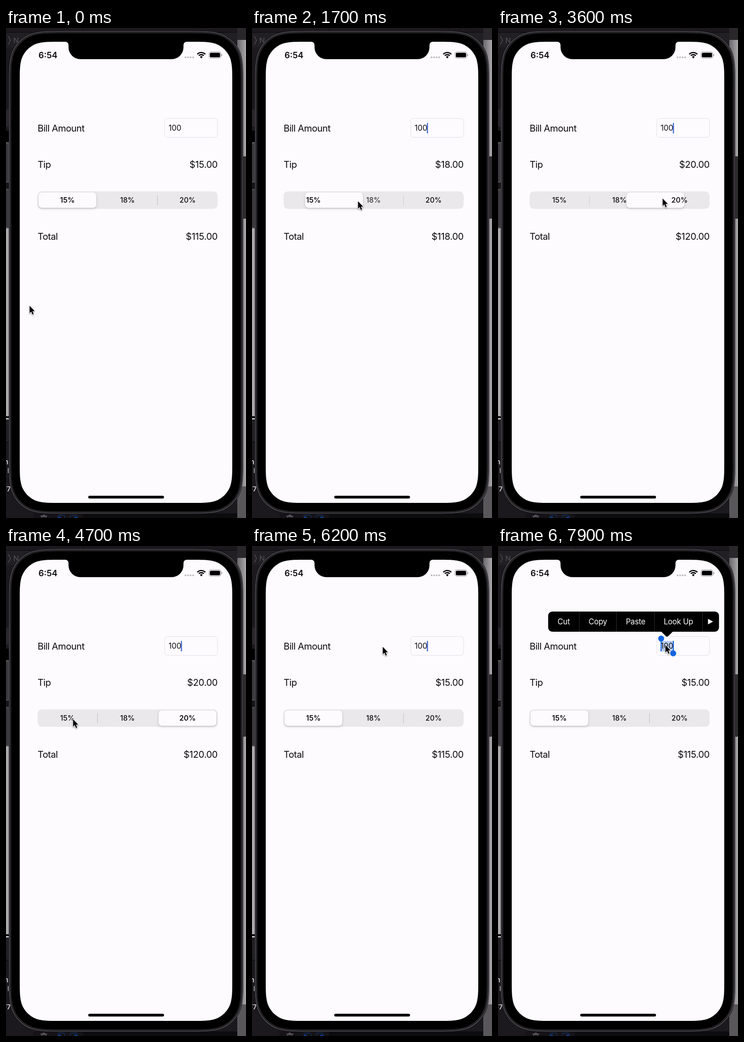
An HTML page with a canvas that plays this animation: 524 by 1069 pixels, repeating every 8 s.

```html
<!DOCTYPE html>
<html lang="en">
<head>
<meta charset="utf-8">
<title>Tip calculator</title>
<style>
html, body { margin: 0; width: 100%; height: 100%; overflow: hidden; background: #1b191d; }
canvas { display: block; width: 524px; height: 1069px; }
</style>
</head>
<body>
<canvas id="stage" width="524" height="1069"></canvas>
<script>
const ctx = document.getElementById('stage').getContext('2d');
const LOOP = 8000;
const INK = '#0b0a0c', SCREEN = '#fdfbfe', BLUE = '#1264e0';
const SANS = 'Inter, "Liberation Sans", sans-serif';
const RATES = [15, 18, 20];

// Each tap selects a rate; the thumb starts sliding at `at`.
const TAPS = [
  { at: 0, index: 0 },
  { at: 1620, index: 1 },
  { at: 3467, index: 2 },
  { at: 5300, index: 0 }
];

// Pointer waypoints: time, x, y.
const POINTER = [
  [0, 51, 605], [100, 45, 599], [220, 32, 580], [450, 85, 490], [700, 190, 400],
  [900, 231, 377], [2520, 231, 377], [2700, 335, 370], [2880, 359, 371],
  [3850, 359, 371], [4080, 255, 376], [4400, 146, 377], [6020, 146, 377],
  [6200, 285, 219], [6400, 374, 212], [6800, 366, 215], [8000, 365, 215]
];

const clamp = v => Math.max(0, Math.min(1, v));
const ramp = (t, from, to) => clamp((t - from) / (to - from));
const smooth = p => p * p * (3 - 2 * p);
const spring = ms => ms <= 0 ? 0 : 1 - (1 + 0.015 * ms) * Math.exp(-0.015 * ms);

function rect(x, y, w, h, color) {
  ctx.fillStyle = color;
  ctx.fillRect(x, y, w, h);
}

function paint(fill, stroke, width) {
  if (fill) { ctx.fillStyle = fill; ctx.fill(); }
  if (stroke) { ctx.strokeStyle = stroke; ctx.lineWidth = width; ctx.stroke(); }
}

function round(x, y, w, h, r, fill, stroke, width = 1) {
  ctx.beginPath();
  ctx.roundRect(x, y, w, h, r);
  paint(fill, stroke, width);
}

// Rounded rectangle whose corners ease into the straight edges.
function squircle(x, y, w, h, r, fill, stroke, width = 1) {
  ctx.beginPath();
  for (let side = 0; side < 4; side++) {
    const a = side * Math.PI / 2, c = Math.cos(a), s = Math.sin(a);
    const along = side % 2 ? h : w, across = side % 2 ? w : h;
    // distances measured back from the corner and inward from the edge
    const at = (back, inward) => {
      const u = along / 2 - back * r, v = inward * r - across / 2;
      return [x + w / 2 + u * c - v * s, y + h / 2 + u * s + v * c];
    };
    ctx.lineTo(...at(1.529, 0));
    ctx.bezierCurveTo(...at(1.088, 0), ...at(0.868, 0), ...at(0.631, 0.075));
    ctx.bezierCurveTo(...at(0.373, 0.169), ...at(0.169, 0.373), ...at(0.075, 0.631));
    ctx.bezierCurveTo(...at(0, 0.868), ...at(0, 1.088), ...at(0, 1.529));
  }
  ctx.closePath();
  paint(fill, stroke, width);
}

function disc(x, y, r, color) {
  ctx.beginPath();
  ctx.arc(x, y, r, 0, Math.PI * 2);
  ctx.fillStyle = color;
  ctx.fill();
}

function poly(points, color) {
  ctx.beginPath();
  points.forEach(([x, y]) => ctx.lineTo(x, y));
  ctx.closePath();
  ctx.fillStyle = color;
  ctx.fill();
}

function text(str, x, y, size, { weight = 400, align = 'left', color = INK, spacing = 0 } = {}) {
  ctx.font = `${weight} ${size}px ${SANS}`;
  ctx.letterSpacing = spacing + 'px';
  ctx.textAlign = align;
  ctx.fillStyle = color;
  ctx.fillText(str, x, y);
}

function faded(alpha, draw) {
  if (alpha <= 0) return;
  ctx.save();
  ctx.globalAlpha = alpha;
  draw();
  ctx.restore();
}

function drawDesktop() {
  rect(0, 0, 524, 1069, '#1b191d');
  rect(0, 9, 506, 1, '#09080a');
  rect(168, 0, 1, 10, '#09080a');
  rect(0, 10, 506, 32, '#211f23');
  text('N', 16, 33, 16, { color: '#565458' });
  ctx.strokeStyle = '#6c6a6e';
  ctx.lineWidth = 1;
  ctx.beginPath();
  ctx.moveTo(5, 18); ctx.lineTo(10, 27); ctx.lineTo(5, 36);
  ctx.stroke();

  // left edge
  rect(0, 178, 8, 37, '#29272b');
  rect(0, 224, 8, 25, '#000');
  rect(0, 249, 8, 88, '#58565a');
  rect(0, 252, 5, 83, '#3a383c');
  rect(0, 337, 8, 14, '#171518');
  rect(0, 351, 8, 86, '#4b494d');
  rect(0, 354, 5, 80, '#39373b');
  rect(0, 437, 8, 410, '#aaa8ab');
  rect(0, 847, 8, 4, '#000');
  rect(0, 851, 8, 3, '#c4c2c5');
  rect(0, 854, 8, 50, '#222024');
  rect(0, 903, 8, 1, '#000');
  text('n', -4, 952, 15, { weight: 600, color: '#d5d3d6' });
  text('l', 3, 971, 15, { color: '#d5d3d6' });
  text('F7', -7, 1011, 15, { weight: 600, color: '#d5d3d6' });

  // right edge, shaded by the phone
  const shade = ctx.createLinearGradient(505, 0, 524, 0);
  shade.addColorStop(0, '#6a686b');
  shade.addColorStop(1, '#a9a7aa');
  rect(505, 0, 19, 26, '#29272a');
  rect(505, 26, 19, 1043, shade);
  rect(505, 280, 19, 136, '#2d2b2e');
  rect(505, 1000, 19, 69, '#59575a');

  // bottom toolbar
  rect(168, 1059, 337, 10, '#0c0b0d');
  rect(60, 1059, 108, 10, '#151317');
  rect(75, 1064, 15, 1.3, '#77757a');
  rect(80, 1062, 5, 1.2, '#77757a');
  round(77.5, 1066, 10, 8, 1, null, '#77757a');
  for (const x of [113, 140]) {
    round(x + 0.5, 1062.5, 15, 12, 2, null, '#123a7c');
    rect(x === 113 ? x + 1 : x + 9, 1066, 6, 3, '#123a7c');
  }
}

function drawPhone() {
  squircle(6, 6, 512, 1054, 77, '#0c0b0d');
  squircle(7.5, 7.5, 509, 1051, 76, '#000', '#58565a', 1.6);
  squircle(10, 10, 504, 1046, 74, null, '#242226', 3);
  squircle(30, 30, 464, 1006, 58, SCREEN);

  // notch
  ctx.beginPath();
  ctx.moveTo(128, 29);
  ctx.lineTo(128, 30);
  ctx.arcTo(136.5, 30, 136.5, 40, 7);
  ctx.arcTo(136.5, 68, 170, 68, 26);
  ctx.arcTo(387.5, 68, 387.5, 40, 26);
  ctx.arcTo(387.5, 30, 396, 30, 7);
  ctx.lineTo(396, 30);
  ctx.lineTo(396, 29);
  ctx.fillStyle = '#000';
  ctx.fill();

  round(179.5, 1020.5, 165.5, 6, 3, '#000');
}

function drawStatusBar() {
  text('6:54', 71, 66, 18.5, { weight: 600 });
  for (let i = 0; i < 4; i++) disc(392 + i * 5.5, 64, 2, '#bebcc0');

  // wifi
  ctx.strokeStyle = '#000';
  ctx.lineWidth = 2.7;
  for (const r of [12, 7.4]) {
    ctx.beginPath();
    ctx.arc(426.4, 65.5, r, -Math.PI * 0.76, -Math.PI * 0.24);
    ctx.stroke();
  }
  ctx.beginPath();
  ctx.moveTo(426.4, 66.5);
  ctx.arc(426.4, 65.5, 4, -Math.PI * 0.76, -Math.PI * 0.24);
  ctx.fillStyle = '#000';
  ctx.fill();

  round(443.2, 52.2, 26, 13.6, 4, null, '#a19fa3', 1.2);
  round(445, 54, 22.4, 10, 2.5, '#000');
  round(470.4, 56.7, 1.7, 4.6, 1, '#a19fa3');
}

function drawLabels(rate) {
  const label = { spacing: -0.5 };
  const amount = { spacing: -0.3, align: 'right' };
  text('Bill Amount', 69, 226, 20.2, label);
  text('Tip', 69, 304.5, 20.2, label);
  text('Total', 69, 462, 20.2, label);
  text(`$${rate}.00`, 462, 304.5, 20.2, amount);
  text(`$${100 + rate}.00`, 462, 462, 20.2, amount);
}

function drawSegments(t, tapNo) {
  const tap = TAPS[tapNo];
  const from = tapNo ? TAPS[tapNo - 1].index : 0;
  const elapsed = t - tap.at;
  const pos = from + (tap.index - from) * (tapNo ? spring(elapsed) : 1);

  round(69, 356.5, 393, 38, 9.5, '#eae8eb');
  [199, 330].forEach((x, i) => faded(clamp(Math.abs(pos - i - 0.5) - 0.5), () =>
    rect(x, 365, 1.2, 22, '#c6c4c8')));

  ctx.save();
  ctx.shadowColor = 'rgba(0,0,0,0.18)';
  ctx.shadowBlur = 5;
  ctx.shadowOffsetY = 2;
  round(71 + pos * 131.2, 358.7, 126, 33.6, 7.5, SCREEN);
  ctx.restore();

  const next = TAPS[tapNo + 1];
  RATES.forEach((rate, i) => {
    let alpha = 1;
    if (next && i === next.index) alpha -= 0.4 * ramp(t, next.at - 130, next.at - 20);
    if (tapNo && i === tap.index) alpha -= 0.4 * (1 - ramp(elapsed, 0, 160));
    const chosen = i === Math.round(pos);
    faded(alpha, () => text(rate + '%', 134 + i * 131.2, 381.3, 15.6,
      { weight: chosen ? 600 : 500, align: 'center' }));
  });
}

function caretAlpha(t) {
  if (t < 100) return 0;
  const phase = (t + 50) % 1000;
  return smooth(ramp(phase, 0, 270)) * (1 - smooth(ramp(phase, 730, 960)));
}

function drawField(t) {
  round(346.5, 197.5, 115.5, 41, 6, SCREEN, '#e2e0e4');
  const selected = t >= 7450;
  if (selected) rect(356, 207, 27, 23, '#b9cdee');
  text('100', 355, 224, 16.6);
  if (!selected) {
    faded(caretAlpha(t), () => round(381.8, 207, 2.4, 23, 1, '#3561d0'));
    return;
  }
  faded(ramp(t, 7580, 7720), () => {
    rect(355, 204, 2.2, 26, BLUE);
    rect(381.8, 207, 2.2, 26, BLUE);
    disc(356.2, 202, 6.5, BLUE);
    disc(382.5, 234.2, 6.5, BLUE);
  });
}

function drawMenu() {
  round(109.5, 143, 373, 44, 9, '#000');
  poly([[356, 186.5], [382, 186.5], [371, 197], [369, 198], [367, 197]], '#000');
  for (const x of [177, 258, 341, 446]) rect(x, 143, 1, 44, '#302e32');
  [['Cut', 143.5], ['Copy', 218], ['Paste', 300.5], ['Look Up', 394]].forEach(([label, x]) =>
    text(label, x, 171, 16.6, { align: 'center', color: '#fff', spacing: -0.2 }));
  poly([[458.5, 159], [469.5, 165], [458.5, 171]], '#fff');
}

function drawPointer(t) {
  const i = Math.max(1, POINTER.findIndex(p => p[0] > t));
  const [t0, x0, y0] = POINTER[i - 1];
  const [t1, x1, y1] = POINTER[i];
  const p = smooth(ramp(t, t0, t1));
  ctx.save();
  ctx.translate(x0 + (x1 - x0) * p + 0.5, y0 + (y1 - y0) * p + 1);
  const arrow = [[0, 0], [0, 16.2], [3.6, 12.8], [6.3, 19], [8.9, 17.9], [6.3, 11.8], [11.2, 11.8]];
  ctx.shadowColor = 'rgba(0,0,0,0.3)';
  ctx.shadowBlur = 3;
  ctx.shadowOffsetY = 1.5;
  ctx.lineJoin = 'round';
  poly(arrow, '#fff');
  ctx.strokeStyle = '#fff';
  ctx.lineWidth = 2;
  ctx.stroke();
  ctx.shadowColor = 'transparent';
  poly(arrow, '#000');
  ctx.restore();
}

function draw(t) {
  const tapNo = TAPS.findLastIndex(tap => tap.at <= t);
  drawDesktop();
  drawPhone();
  drawStatusBar();
  drawLabels(RATES[TAPS[tapNo].index]);
  drawSegments(t, tapNo);
  drawField(t);
  faded(ramp(t, 7620, 7880), drawMenu);
  drawPointer(t);
}

const start = performance.now();
function tick() {
  draw((performance.now() - start) % LOOP);
  requestAnimationFrame(tick);
}
tick();
</script>
</body>
</html>
```
